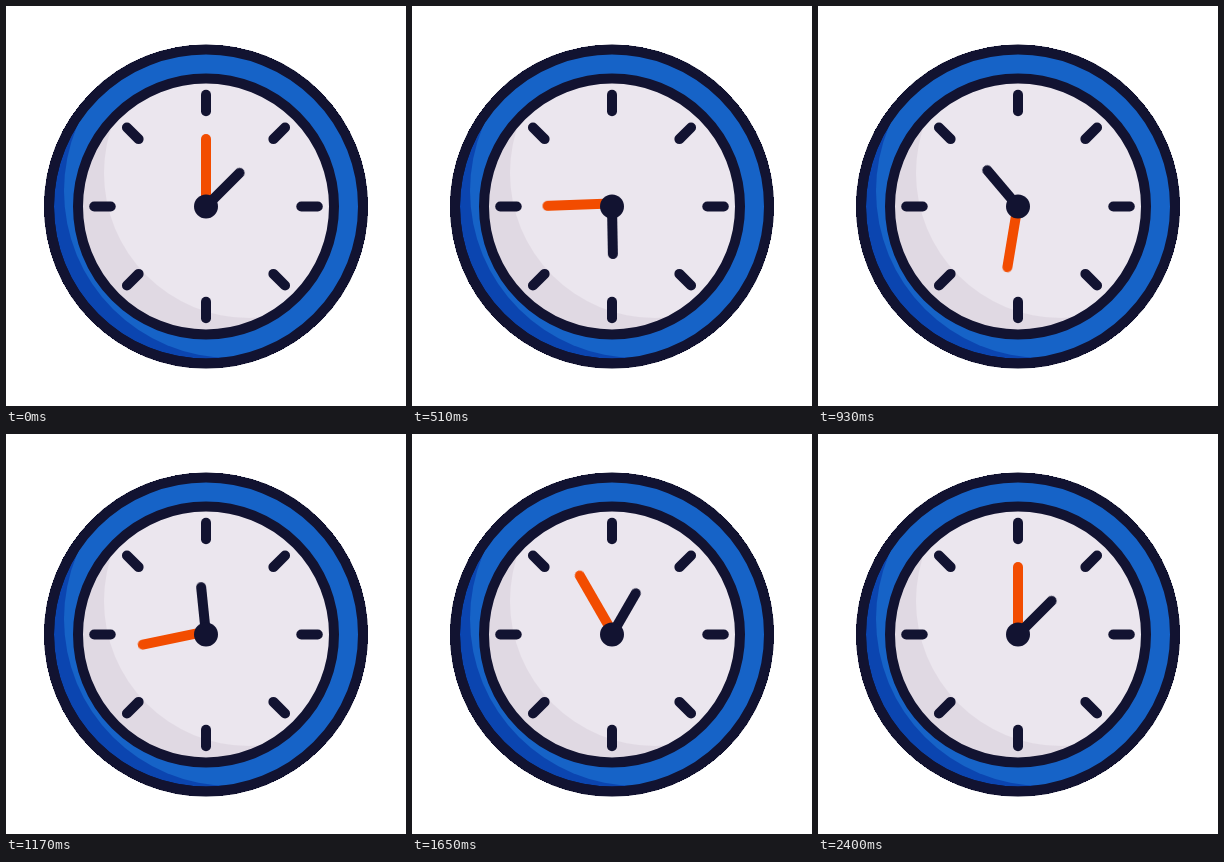
Recreate the animation shown at these times as an HTML page. Size 400x400 px, loop 2430 ms.

```html
<!DOCTYPE html>
<html lang="en">
<head>
<meta charset="utf-8">
<title>Clock</title>
<style>
  html, body {
    margin: 0;
    width: 100%;
    height: 100%;
    overflow: hidden;
    background: #fff;
  }
  svg { display: block; width: 100vw; height: 100vh; }

  .ink { stroke: #121331; stroke-width: 10; stroke-linecap: round; fill: none; }
  .minute { stroke: #f24c00; }

  /* One eased sweep of 2400 ms, then a 30 ms rest before the loop restarts. */
  .hand { animation: 2430ms infinite; }
  .hour { animation-name: hour; transform-origin: 200px 200.5px; }
  .minute { animation-name: minute; transform-origin: 200px 197.5px; }

  @keyframes hour {
    0% { transform: rotate(45deg); animation-timing-function: cubic-bezier(.333, 0, 0, 1); }
    98.7654%, 100% { transform: rotate(405deg); }
  }
  @keyframes minute {
    0% { transform: rotate(0deg); animation-timing-function: cubic-bezier(.333, 0, 0, 1); }
    98.7654%, 100% { transform: rotate(720deg); }
  }
</style>
</head>
<body>
<svg viewBox="0 0 400 400">
  <defs>
    <clipPath id="rim"><circle cx="200" cy="200.5" r="155"/></clipPath>
    <clipPath id="face"><circle cx="200" cy="200.5" r="126"/></clipPath>
    <path id="tick" class="ink" d="M200 88.7V105.2"/>
  </defs>

  <circle cx="200" cy="200.5" r="162" fill="#121331" shape-rendering="crispEdges"/>
  <circle cx="200" cy="200.5" r="152" fill="#0b45b0"/>
  <g clip-path="url(#rim)">
    <circle cx="225" cy="185" r="167" fill="#1663c7"/>
  </g>
  <circle class="ink" cx="200" cy="200.5" r="157"/>

  <circle cx="200" cy="200.5" r="126" fill="#e0d9e3"/>
  <g clip-path="url(#face)">
    <circle cx="243" cy="167" r="145" fill="#ebe6ee"/>
  </g>
  <circle class="ink" cx="200" cy="200.5" r="128"/>

  <g id="ticks">
    <use href="#tick"/>
    <use href="#tick" transform="rotate(45 200 200.5)"/>
    <use href="#tick" transform="rotate(90 200 200.5)"/>
    <use href="#tick" transform="rotate(135 200 200.5)"/>
    <use href="#tick" transform="rotate(180 200 200.5)"/>
    <use href="#tick" transform="rotate(225 200 200.5)"/>
    <use href="#tick" transform="rotate(270 200 200.5)"/>
    <use href="#tick" transform="rotate(315 200 200.5)"/>
  </g>

  <path class="ink hand minute" d="M200 197.5V133"/>
  <path class="ink hand hour" d="M200 200.5V153"/>
  <circle cx="200" cy="200.5" r="12" fill="#121331"/>
</svg>
</body>
</html>
```
